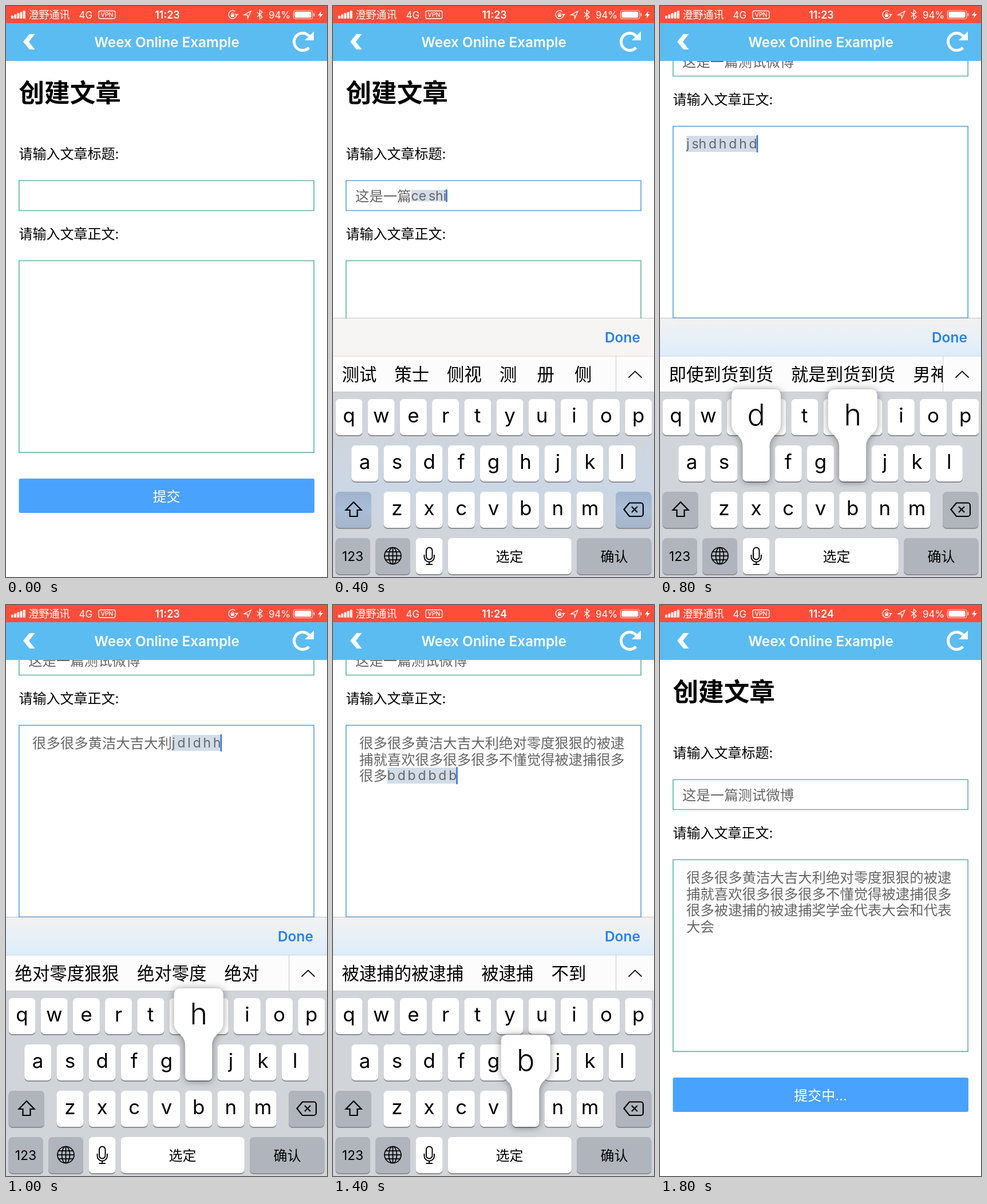
An HTML page with a canvas that plays this animation: 561 px wide and 998 px high, repeating every 2 s.

```html
<!DOCTYPE html>
<html lang="zh-CN">
<head>
<meta charset="utf-8">
<title>创建文章</title>
<style>
html, body { margin: 0; width: 100%; height: 100%; overflow: hidden; background: #fff; }
canvas { display: block; width: 100vw; height: 100vh; }
</style>
</head>
<body>
<canvas id="stage" width="561" height="998"></canvas>
<script>
const ctx = document.getElementById('stage').getContext('2d');
const FONT = 'Inter, "Noto Sans CJK SC", "Noto Sans CJK", sans-serif';
const GREEN = '#5eb49e', BLUE = '#58a0e0', GREY = '#666';
const STEP = 100, LOOP = 2000, SCROLL = 235, PER_LINE = 19, CHAR = 24.4;
const THIN = '\u2006';

const TITLE = '这是一篇测试微博';
const BODY = '很多很多黄洁大吉大利绝对零度狠狠的被逮' +
  '捕就喜欢很多很多很多不懂觉得被逮捕很多' +
  '很多被逮捕的被逮捕奖学金代表大会和代表大会';
const MARKS = [[',', 22], ['。', 98], ['?', 156], ['!', 222], ['、', 296], ['……', 366]];

// Each step: focused field, characters committed, pinyin pending, candidates, pressed keys
const typing = (field, count, pending = '', words = '', pressed = '') =>
  ({ field, count, pending: pending.replaceAll(' ', THIN), words, pressed });
const steps = [
  { button: '提交' },
  typing('title', 0, '', '我 你 在 这 好 不'),
  typing('title', 0, 'zhe hsi y', '这是要 这是 在 这 这时 这事'),
  typing('title', 3, 'pian', '篇 片 偏 骗 便 翩'),
  typing('title', 4, 'ce shi', '测试 策士 侧视 测 册 侧'),
  typing('title', 6, 'wei b', '微博 未必 尾部 为 位 未'),
  typing('title', 8, '', '客户端 测试 真是 看到 的 上'),
  typing('body', 0, '', '我 你 在 这 好 不'),
  typing('body', 0, 'j sh d h d h d', '即使到货到货 就是到货到货 男神', 'dh'),
  typing('body', 4, 'h j d j d l', '黄洁大吉大利 黄金 会计', 'd'),
  typing('body', 10, 'j d l d h h', '绝对零度狠狠 绝对零度 绝对', 'h'),
  typing('body', 16, 'd b d b', '的被逮捕 得不到 带宝', 'b'),
  typing('body', 20, 'j x h hdj d jdh d h d b', '就喜欢很多很多很多吧 就喜欢 继续', 'db'),
  typing('body', 29, 'b d j d b d b', '不懂觉得被逮捕 不懂 不得', 'd'),
  typing('body', 40, 'b d b d b d b', '被逮捕的被逮捕 被逮捕 不到', 'b'),
  typing('body', 47, 'j x j d b d h', '奖学金代表大会 奖学金 教学', 'h'),
  typing('body', BODY.length),
  { button: '提交', filled: true },
  { button: '提交中...', filled: true }
];

function text(str, x, y, size, color = '#000', align = 'left', weight = 400) {
  ctx.font = `${weight} ${size}px ${FONT}`;
  ctx.fillStyle = color;
  ctx.textAlign = align;
  ctx.fillText(str, x, y);
}
// Places Chinese text by the vertical middle of its line
const hanzi = (str, x, middle, size, ...rest) => text(str, x, middle + size * 0.37, size, ...rest);

function rect(x, y, w, h, color) {
  ctx.fillStyle = color;
  ctx.fillRect(x, y, w, h);
}
function round(x, y, w, h, r, color) {
  ctx.beginPath();
  ctx.roundRect(x, y, w, h, r);
  ctx.fillStyle = color;
  ctx.fill();
}
function path(points, closed) {
  ctx.beginPath();
  points.forEach(([x, y]) => ctx.lineTo(x, y));
  if (closed) ctx.closePath();
}
function line(points, width, color, closed) {
  path(points, closed);
  pen(width, color);
}
function pen(width, color) {
  ctx.lineWidth = width;
  ctx.strokeStyle = color;
  ctx.stroke();
}
function polygon(points, color) {
  path(points, true);
  ctx.fillStyle = color;
  ctx.fill();
}
function fade(y0, y1, ...colors) {
  const g = ctx.createLinearGradient(0, y0, 0, y1);
  colors.forEach((c, i) => g.addColorStop(i / (colors.length - 1), c));
  return g;
}
function clipped(x, y, w, h, draw) {
  ctx.save();
  ctx.beginPath();
  ctx.rect(x, y, w, h);
  ctx.clip();
  draw();
  ctx.restore();
}

function statusBar(clock) {
  const ink = '#fff';
  rect(0, 0, 561, 30, '#fe4e3a');
  for (let i = 0; i < 5; i++) round(9 + i * 5.2, 17 - i * 2.2, 4, 5 + i * 2.2, 1, ink);
  hanzi('澄野通讯', 39.5, 15.5, 18, ink);
  text('4G', 127.5, 22, 17, ink);
  ctx.beginPath();
  ctx.roundRect(162, 8.5, 29, 13.5, 3);
  pen(1.3, ink);
  text('VPN', 176.5, 19.2, 10.5, ink, 'center', 500);
  text(clock, 282, 22, 18, ink, 'center', 600);

  ctx.beginPath();
  ctx.arc(396, 15, 7, -0.2, 5.4);
  pen(1.3, ink);
  polygon([[400, 14], [406, 14], [403, 18]], ink);
  rect(393, 14.5, 6, 4.5, ink);
  ctx.beginPath();
  ctx.arc(396, 14, 2, Math.PI, 0);
  pen(1.2, ink);
  line([[416, 15.5], [428, 9], [422.5, 21.5], [421.8, 15.8]], 1.3, ink, true);
  line([[439, 11], [448, 19], [443.5, 23], [443.5, 7], [448, 11], [439, 19]], 1.3, ink);
  text('94%', 459, 22, 17, ink);
  ctx.beginPath();
  ctx.roundRect(502.5, 8, 33.5, 14.5, 3.5);
  pen(1.2, '#ffd0ca');
  round(504.5, 10, 29, 10.5, 2, ink);
  round(537.5, 12.5, 2, 5.5, 1, '#ffd0ca');
  polygon([[551, 9], [545, 16.5], [549, 16.5], [547.5, 22], [554, 14], [550, 14]], ink);
}

function navBar() {
  rect(0, 30, 561, 66, '#5bbcf2');
  polygon([[30, 62.5], [41, 49], [50.5, 49], [40, 62.5], [50.5, 76], [41, 76]], '#fff');
  text('Weex Online Example', 281, 71.5, 24.3, '#fff', 'center', 600);
  ctx.beginPath();
  ctx.arc(518.5, 62.5, 15, 0.75, 5.55);
  pen(5, '#fff');
  polygon([[538, 44.5], [538, 60], [522, 60]], '#fff');
}

function field(x, y, w, h, focused) {
  ctx.beginPath();
  ctx.rect(x, y, w, h);
  pen(1.6, focused ? BLUE : GREEN);
}

function entry(x, middle, committed, pending, height, caret) {
  const rows = Math.max(0, Math.ceil(committed.length / PER_LINE) - 1);
  for (let i = 0; i <= rows; i++) {
    hanzi(committed.slice(i * PER_LINE, (i + 1) * PER_LINE), x, middle + i * 28.6, CHAR, GREY);
  }
  if (!caret) return;
  const cy = middle + rows * 28.6;
  let end = x + (committed.length - rows * PER_LINE) * CHAR;
  if (pending) {
    ctx.font = `400 23px ${FONT}`;
    const width = ctx.measureText(pending).width;
    rect(end, cy - height / 2, width, height, '#d2dde9');
    text(pending, end, cy + 8, 23, GREY);
    end += width;
  }
  rect(end - 1, cy - height / 2 - 1, 2.6, height + 2, caret);
}

function page(s) {
  const { field: focus, count = 0, pending = '' } = s;
  const inTitle = focus === 'title', inBody = focus === 'body';
  const title = inTitle ? TITLE.slice(0, count) : inBody || s.filled ? TITLE : '';
  const body = inBody ? BODY.slice(0, count) : s.filled ? BODY : '';
  const done = inTitle && count === TITLE.length;

  ctx.save();
  if (inBody) ctx.translate(0, -SCROLL);
  hanzi('创建文章', 22.5, 151, 44.6, '#000', 'left', 700);
  hanzi('请输入文章标题:', 22.5, 258.5, 24);
  field(22.8, 305.3, 515.4, 52.2, inTitle);
  entry(39, done ? 326.5 : 331.5, title, pending, 20, inTitle && !done && '#3477d6');
  if (done) rect(233, 321, 2.6, 21, '#d3d6da');
  hanzi('请输入文章正文:', 22.5, 398.5, 24);
  field(22.8, 445.2, 515.4, 335.2, inBody);
  entry(46, 476, body, pending, 28, inBody && '#3477d6');
  if (s.button) {
    round(22.5, 826, 516.5, 60, 3, '#4aa2ff');
    hanzi(s.button, 280.5, 857, 24, '#fff', 'center');
  }
  ctx.restore();
}

function key(x, y, w, color = '#fff') {
  round(x, y + 2, w, 63, 7, '#8b8e94');
  round(x, y, w, 63, 7, color);
}

function balloon(cx, y, letter) {
  const top = y - 98, shoulder = top + 61, bend = top + 79, neck = top + 100;
  const half = 23.5, wide = 43;
  ctx.save();
  ctx.shadowColor = 'rgba(0,0,0,.42)';
  ctx.shadowBlur = 13;
  ctx.shadowOffsetY = 1;
  ctx.beginPath();
  ctx.moveTo(cx - wide + 10, top);
  ctx.arcTo(cx + wide, top, cx + wide, top + 10, 10);
  ctx.lineTo(cx + wide, shoulder);
  ctx.bezierCurveTo(cx + wide, bend, cx + half, bend, cx + half, neck);
  ctx.arcTo(cx + half, y + 63, cx, y + 63, 7);
  ctx.arcTo(cx - half, y + 63, cx - half, y, 7);
  ctx.lineTo(cx - half, neck);
  ctx.bezierCurveTo(cx - half, bend, cx - wide, bend, cx - wide, shoulder);
  ctx.arcTo(cx - wide, top, cx - wide + 10, top, 10);
  ctx.closePath();
  ctx.fillStyle = '#fff';
  ctx.fill();
  ctx.restore();
  text(letter, cx, top + 62.5, 52, '#000', 'center', 300);
}

function keyIcons() {
  const ink = '#000';
  line([[36, 867], [49.5, 881], [42.5, 881], [42.5, 892], [29.5, 892], [29.5, 881], [22.5, 881]], 2.2, ink, true);
  ctx.beginPath();
  ctx.moveTo(508.5, 880);
  ctx.lineTo(518, 868.5);
  ctx.arcTo(542, 868.5, 542, 880, 4);
  ctx.arcTo(542, 892, 518, 892, 4);
  ctx.lineTo(518, 892);
  ctx.closePath();
  pen(2.2, ink);
  line([[522, 875], [532, 885]], 2.2, ink);
  line([[532, 875], [522, 885]], 2.2, ink);

  const gx = 104.5, gy = 961;
  for (const rx of [14.5, 7]) {
    ctx.beginPath();
    ctx.ellipse(gx, gy, rx, 14.5, 0, 0, Math.PI * 2);
    pen(1.7, ink);
  }
  line([[gx, gy - 14], [gx, gy + 14]], 1.7, ink);
  for (const dy of [-7, 0, 7]) {
    const half = Math.sqrt(14.5 ** 2 - dy ** 2);
    line([[gx - half, gy + dy], [gx + half, gy + dy]], 1.7, ink);
  }

  ctx.beginPath();
  ctx.roundRect(163, 946.5, 10.5, 21, 5.2);
  pen(1.9, ink);
  ctx.beginPath();
  ctx.moveTo(159.5, 959);
  ctx.lineTo(159.5, 963);
  ctx.arc(168.2, 963, 8.7, Math.PI, 0, true);
  ctx.lineTo(176.9, 959);
  pen(1.9, ink);
  line([[168.2, 972], [168.2, 976]], 1.9, ink);
  line([[162.5, 976], [174, 976]], 1.9, ink);
}

function candidates(words) {
  rect(0, 612, 561, 62, '#fcfcfc');
  rect(0, 611.5, 561, 1, '#d5d6d8');
  if (!words) {
    MARKS.forEach(([mark, x]) => text(mark, x, 653.5, 27, '#000', 'center'));
    return;
  }
  clipped(0, 612, 494.5, 62, () => {
    let x = 15.5;
    for (const word of words.split(' ')) {
      hanzi(word, x, 643.5, 30.4);
      x += Math.max(65.5, word.length * 30.4 + 31);
    }
  });
  rect(494, 612, 1.2, 62, '#cfd1d4');
  line([[516.5, 649.5], [528, 638.5], [539.5, 649.5]], 1.8, '#111');
}

function keyboard(s) {
  const tinted = s.field === 'title';
  rect(0, 546, 561, 66, tinted ? '#f7f5f4' : fade(546, 612, '#f1f1f1', '#e9f0f7', '#dcecfb'));
  ctx.globalAlpha = 0.5;
  rect(0, 545, 561, 1, '#85878a');
  ctx.globalAlpha = 1;
  text('Done', 537, 588, 24.5, '#2a82e8', 'right', 600);
  candidates(s.words);

  const plain = '#d1d4d9', dark = '#b0b4bc';
  rect(0, 674, 561, 324, tinted ? fade(674, 998, plain, '#d0d5dc', '#cbd7e5', '#d0d5dc', plain) : plain);
  rect(0, 674, 561, 1, '#c5c8cc');
  const pressed = [];
  [['qwertyuiop', 4.5, 687], ['asdfghjkl', 32.2, 768], ['zxcvbnm', 88.4, 849]].forEach(([letters, x0, y]) => {
    [...letters].forEach((letter, i) => {
      const x = x0 + i * 56.2;
      key(x, y, 47);
      if (s.pressed.includes(letter)) pressed.push([x + 23.5, y, letter]);
      else text(letter, x + 23.5, y + 40.5, 35, '#000', 'center');
    });
  });
  const side = tinted ? fade(849, 912, '#9fb4cf', '#a9bdd7', '#a7b6ca') : dark;
  key(4.5, 849, 62.5, side);
  key(494, 849, 62.5, side);
  key(4.5, 930, 60.5, dark);
  key(74, 930, 61, dark);
  key(144.6, 930, 47);
  key(200.8, 930, 216);
  key(426, 930, 130.5, dark);
  keyIcons();
  text('123', 34.5, 970, 23, '#000', 'center');
  hanzi(s.pending ? '选定' : '空格', 308.5, 962.5, 24, '#000', 'center');
  hanzi(s.pending ? '确认' : '换行', 491.5, 962.5, 24, '#000', 'center');
  pressed.forEach(args => balloon(...args));
}

function draw(now) {
  const index = Math.min(Math.floor(now % LOOP / STEP), steps.length - 1);
  const s = steps[index];
  rect(0, 0, 561, 998, '#fff');
  page(s);
  navBar();
  statusBar(index < 14 ? '11:23' : '11:24');
  if (s.field) keyboard(s);
}

const start = performance.now();
function tick() {
  draw(performance.now() - start);
  requestAnimationFrame(tick);
}
tick();
</script>
</body>
</html>
```
